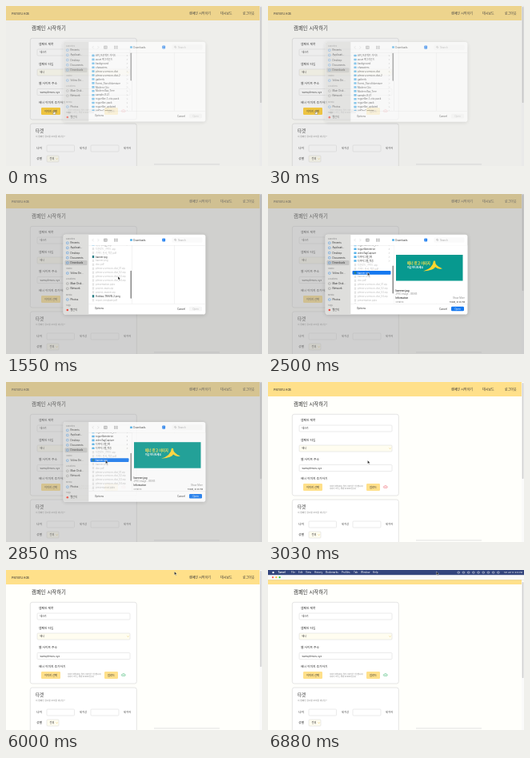
Write an HTML page that moves like this. It is 320 by 200 pixels and loops after 6920 ms.

```html
<!DOCTYPE html>
<html>
<head>
<meta charset="utf-8">
<style>
  html, body { margin: 0; height: 100%; overflow: hidden; background: #fffffb }
  svg { display: block; width: 100vw; height: 100vh }
  text { font-family: Inter, "Noto Sans CJK KR", "Noto Sans CJK", sans-serif; white-space: pre }
</style>
</head>
<body>
<svg id="stage" viewBox="0 0 320 200"></svg>
<script>
const LOOP = 6920;
const YELLOW = '#ffe08a', INK = '#333', GREY = '#888', BLUE = '#1478f0';

const rect = (x, y, w, h, fill, extra = '') =>
  `<rect x="${x}" y="${y}" width="${w}" height="${h}" fill="${fill}" ${extra}/>`;
const text = (x, y, size, s, fill = INK, extra = '') =>
  `<text x="${x}" y="${y}" font-size="${size}" fill="${fill}" ${extra}>${s}</text>`;
const path = (d, stroke, width = .5, extra = 'fill="none"') =>
  `<path d="${d}" stroke="${stroke}" stroke-width="${width}" ${extra}/>`;
const dot = (x, y, r, fill) => `<circle cx="${x}" cy="${y}" r="${r}" fill="${fill}"/>`;
const group = (id, body, extra = '') => `<g id="${id}" ${extra}>${body}</g>`;

const BOLD = 'font-weight="600"', MID = 'text-anchor="middle"', END = 'text-anchor="end"';
const field = (x, y, w, s = '', fill = '#fff') =>
  rect(x, y, w, 8, fill, 'rx="1" stroke="#d6d6d6" stroke-width=".5"') + text(x + 3.5, y + 5.2, 3, s);
const card = (y, h) => rect(30.3, y, 133, h, '#fff', 'rx="2.5" stroke="#d4d4d4" stroke-width=".6"');
const chevron = (x, y) => path(`M${x} ${y}l1 1 1-1`, '#e0b73c');
const button = (id, x, w, s) =>
  rect(x, 127, w, 9, YELLOW, `id="${id}" rx="1.2"`) + text(x + w / 2, 132.9, 3.3, s, INK, MID + ' font-weight="500"');

function page() {
  const label = (y, s) => text(41, y, 3.8, s, INK, 'font-weight="500"');
  return rect(0, 0, 320, 200, '#fffffb') + rect(0, 0, 320, 18, YELLOW) +
    text(7, 10.7, 3.8, 'Plenoru Ads') +
    text(229, 10.7, 4, '캠페인 시작하기') + text(268, 10.7, 4, '대시보드') + text(296, 10.7, 4, '로그아웃') +
    text(32, 30.2, 6.4, '캠페인 시작하기') +
    card(40.3, 101.7) +
    label(49.4, '캠페인 제목') + field(39, 54, 116, '테스트') +
    label(73.9, '캠페인 타입') + field(39, 79, 116, '배너', '#fffdf0') + chevron(151.5, 82.5) +
    label(98.2, '웹 사이트 주소') + field(39, 103.5, 116, 'www.plenoru.xyz') +
    label(122.4, '배너 이미지 추가하기') +
    button('pick', 44, 24, '이미지 선택') +
    text(77, 130.6, 2.3, '이미지 파일(jpg, 정지 이미지만 가능합니다)', GREY) +
    text(77, 134.3, 2.3, '이미지 크기는 최대 500KB 입니다', GREY) +
    button('send', 123, 17, '업로드') +
    group('cloud', path('M145.3 132.5a1.1 1.1 0 0 1 .1-2.2 1.5 1.5 0 0 1 2.7-.2 1.2 1.2 0 0 1 .1 2.4z', 'currentColor', .5, 'fill="currentColor" fill-opacity=".3"')) +
    card(147, 60) +
    text(37, 158.3, 5.5, '타겟') + text(37, 164, 2.7, '이 캠페인 광고를 보여줄 대상은?', GREY) +
    text(38, 179.2, 3.9, '나이') + field(51, 174, 34.5) + text(92, 179, 3, '세 이상') +
    field(106, 174, 35) + text(147, 179, 3, '세 이하') +
    text(38, 192.4, 3.9, '성별') + field(51, 187, 15, '전체', '#fffdf0') + chevron(62.6, 190.5) +
    rect(185, 197.6, 82, .7, '#d4d4d4') +
    rect(317, 0, 3, 200, '#fafafa') + rect(317.7, 1, 1.7, 120, '#d0d0d0', 'id="pageThumb" rx=".85"');
}

const FILES = `API_프로젝트 가이드
asset 백그라운드
background
characters
plenoru-version-dist
plenoru-version-dist-2
gatherly
Forest_StoryAdventure
Modern City
Modern Bay_Tree
sample-8.2.1
roguelike-1-city-pack
roguelike-pack
roguelike_updated
utilTagCapture
roguelikeforest_2.0
roguelikeinterior
videoTagCapture
다이어그램_1차
다이어그램_최종
다운로드_가이드.zip
가이드 문서_최종.pdf
banner.jpg
banner.png
doc.pdf
plenoru-version-dist_01.zip
plenoru-version-dist_02.zip
plenoru-version-dist_03.zip
plenoru-version-dist_04.zip
presentation.pptx
project-main.zip
project-master.zip
Holiday-TRAVEL2.jpeg
report-template.pdf`.split('\n');
const PICTURE = 22, FOLDERS = 20, ROW = 4.93;

function files() {
  return FILES.map((name, i) => {
    const y = 68 + i * ROW, folder = i < FOLDERS;
    const live = folder || /\.jpe?g$/.test(name);
    const icon = folder ? rect(107.4, y - 1.4, 3.2, 2.6, '#58b4ea', 'rx=".5"')
      : rect(107.8, y - 1.6, 2.4, 3.2, live ? '#2b7f86' : '#e4e4e4');
    return (i == PICTURE ? rect(105.5, y - 2.4, 48, 4.8, BLUE, 'id="pickRow" rx="1"') : '') + icon +
      text(112, y + 1.1, 2.9, name, live ? INK : '#b8b8b8', i == PICTURE ? 'id="pickName"' : '') +
      (folder ? path(`M151 ${y - .9}l.9.9-.9.9`, '#999', .4) : '');
  }).join('');
}

function sidebar() {
  const head = (y, s) => text(75, y, 2.5, s, '#999', BOLD);
  const item = (y, s, color = '#3f8fe0') =>
    rect(75.5, y - 2.2, 2.6, 2.4, 'none', `rx=".6" stroke="${color}" stroke-width=".5"`) + text(80.5, y, 3, s);
  return rect(71, 50, 32, 101, '#dededc') + rect(73.5, 83, 28, 6, '#c4c4c3', 'rx="1.2"') +
    head(57, 'Favorites') + item(62.2, 'Recents') + item(68.3, 'Applicati…') + item(74.5, 'Desktop') +
    item(80.7, 'Documents') + item(87, 'Downloads') +
    head(93.5, 'Volino') + item(100, 'Volino Dri…') +
    head(107, 'Locations') + item(113, 'Main Disk…', GREY) + item(119.2, 'Network', GREY) +
    head(126.5, 'Media') + item(133, 'Photos') + head(139.5, 'Tags') +
    dot(76.8, 145, 1.3, '#f0483e') + text(80.5, 146, 3, '빨간색');
}

function preview() {
  return rect(157.6, 64.3, 92, 72.5, '#fff') + rect(160, 76, 83.5, 32.5, '#07998f') +
    text(174, 88, 4.2, '배너 광고 이미지', '#ffe24a', 'font-weight="800"') +
    text(174, 93, 3, '지금 만나보세요', '#fff', BOLD) +
    '<path d="M207 83.5l2 .3q-.5 6 9 9.500-5 1.500-9-2-1 4-15 5.200 12-3.500 13-13z" fill="#ffd72e"/>' +
    text(159.5, 121.8, 3.3, 'banner.jpg', INK, BOLD) +
    text(159.5, 126, 2.8, 'JPEG image - 88 KB', GREY) +
    text(159.5, 131.3, 2.8, 'Information', INK, BOLD) + text(246, 131.3, 2.8, 'Show More', GREY, END) +
    text(159.5, 136, 2.6, 'Created', GREY) + text(246, 136, 2.6, 'Today, 8:43 PM', INK, END);
}

function dialog() {
  const line = (x, y, w, h) => rect(x, y, w, h, '#e2e2e2');
  return rect(71.5, 51.5, 178, 100, '#000', 'rx="3" opacity=".16" filter="url(#soft)"') +
    group('', rect(71, 50, 179, 101, '#fff') + sidebar() +
      line(103, 50, .4, 101) + line(103, 64, 147, .4) +
      path('M109.500 56l-1.500 1.600 1.500 1.600M114.500 56l1.500 1.600-1.500 1.600', '#bbb', .4) +
      path('M122.500 56h3.800v3.200h-3.800zM123.800 56v3.200M125 56v3.200', '#666', .4) +
      path('M135.500 56h1.300v1.200h-1.300zM138 56h1.300v1.200h-1.300zM135.500 58.200h1.300v1h-1.300zM138 58.200h1.300v1h-1.300z', '#777', .4) +
      rect(155, 56.2, 3, 2.5, '#58b4ea', 'rx=".5"') + text(159.3, 58.6, 2.9, 'Downloads') +
      rect(195.3, 55.4, 3.8, 4.2, BLUE, 'rx="1"') + path('M196.400 57l.8-.9.8.9M196.400 58.100l.8.9.8-.9', '#fff', .4) +
      rect(207.5, 54.2, 38, 6.6, '#fafafa', 'rx="1.3"') +
      '<circle cx="211.5" cy="57.2" r=".9" fill="none" stroke="#888" stroke-width=".4"/>' + path('M212.200 57.900l.8.8', GREY, .4) +
      text(215, 58.6, 2.9, 'Search', '#aaa') +
      line(157.2, 64, .4, 73) + line(210, 64, .4, 73) +
      group('', group('list', files()), 'clip-path="url(#listBox)"') +
      rect(155.5, 64.5, 1.5, 35, '#8c8c8c', 'id="thumb" rx=".75"') +
      group('preview', preview()) + line(103, 137, 147, .4) +
      text(111, 144.4, 3, 'Options') +
      text(219, 144.6, 3, 'Cancel', INK, MID) +
      rect(229, 140.7, 16, 5.6, '#f7f7f7', 'id="open" rx="1.2"') + text(237, 144.6, 3, 'Open', '#bbb', MID + ' id="openText"'),
      'clip-path="url(#sheet)"');
}

function menuBar() {
  const items = [[12.5, 'Tarvel'], [29, 'File'], [38, 'Edit'], [47, 'View'], [58, 'History'], [72, 'Bookmarks'],
    [92, 'Profiles'], [107, 'Tab'], [116, 'Window'], [131, 'Help']];
  let icons = '';
  for (let x = 237; x < 292; x += 6.2)
    icons += rect(x, 2.1, 2.5, 2, 'none', 'rx=".6" stroke="#fff" stroke-width=".5"');
  return rect(0, 12, 320, 1, '#000', 'opacity=".08"') + rect(0, 6, 320, 6.2, '#fafafa') +
    rect(0, 0, 320, 6.2, '#34457d') + dot(6.5, 3.1, 1.2, '#fff') +
    items.map(([x, s], i) => text(x, 4.2, 3, s, '#fff', i ? '' : 'font-weight="700"')).join('') + icons +
    text(318, 4.2, 2.4, 'Tue Jun 14  8:44 PM', '#fff', END) +
    dot(6, 9.2, 1.1, '#fb5f57') + dot(10.3, 9.2, 1.1, '#fdbc2e') + dot(14.6, 9.2, 1.1, '#28c840');
}

document.getElementById('stage').innerHTML =
  `<defs><clipPath id="sheet"><rect x="71.7" y="50.8" width="177.7" height="99.8" rx="2.8"/></clipPath>
   <clipPath id="listBox"><rect x="104" y="64.4" width="50" height="72.5"/></clipPath>
   <filter id="soft"><feGaussianBlur stdDeviation="2.5"/></filter></defs>` +
  page() + rect(0, 0, 320, 200, '#9b9b9b', 'id="dim"') + group('dialog', dialog()) + group('menu', menuBar()) +
  group('cursor',
    group('arrow', path('M0 0v4l1-.8.7 1.5.7-.3-.7-1.5h1.3z', '#fff', .35, 'fill="#111"')) +
    group('hand', path('M-.4 0h.8v1.7l1.6.4-.3 2.3h-2.5L-1.8 2.8l.5-.5.9.5z', '#333', .3, 'fill="#fff"')));

const el = id => document.getElementById(id);
const set = (id, name, value) => el(id).setAttribute(name, value);
const show = (id, on) => set(id, 'visibility', on ? 'visible' : 'hidden');

// Eased value of [time, ...values] keys at time t
function at(t, ...keys) {
  const i = keys.findIndex(k => k[0] > t);
  if (i == 0) return keys[0].slice(1);
  if (i < 0) return keys.at(-1).slice(1);
  const a = keys[i - 1], b = keys[i], u = (t - a[0]) / (b[0] - a[0]), e = u * u * (3 - 2 * u);
  return a.slice(1).map((v, j) => v + (b[j + 1] - v) * e);
}
const hoverColor = h => `rgb(255,${224 - 20 * h},${138 - 92 * h})`;

function draw(t) {
  const [open, drop, dim] = at(t, [0, .65, -6, .17], [350, 1, 0, .47], [2800, 1, 0, .47], [3020, 0, -6, 0]);
  set('dialog', 'opacity', open);
  set('dialog', 'transform', `translate(0 ${drop})`);
  set('dim', 'opacity', dim);

  const [scroll] = at(t, [750, 0], [1000, 92], [1150, 98], [1550, 98], [2000, 78]);
  set('list', 'transform', `translate(0 ${-scroll})`);
  set('thumb', 'y', 64.5 + scroll * .32);

  const picked = t >= 2400;
  show('pickRow', picked);
  set('pickName', 'fill', picked ? '#fff' : INK);
  show('preview', t >= 2450);
  set('open', 'fill', picked ? BLUE : '#f7f7f7');
  set('openText', 'fill', picked ? '#fff' : '#bbb');

  set('pick', 'fill', hoverColor(at(t, [0, 1], [300, 0])[0]));
  set('send', 'fill', hoverColor(at(t, [3400, 0], [3680, 1], [5200, 1], [5450, 0])[0]));
  set('cloud', 'color', t < 4130 ? '#f0808a' : '#62c58c');

  const [x, y] = at(t, [0, 60, 131], [100, 60, 131], [620, 129, 102], [750, 129, 102], [1000, 140, 103],
    [1550, 140, 103], [2200, 124.5, 98], [3080, 124.5, 98], [3430, 131, 131], [5030, 131, 131],
    [5700, 155, 135], [6000, 210.5, 2]);
  set('cursor', 'transform', `translate(${x} ${y})`);
  const hand = t < 120 || (t > 3400 && t < 5300);
  show('hand', hand);
  show('arrow', !hand);

  const [slide] = at(t, [6150, -14], [6500, 0]);
  set('menu', 'transform', `translate(0 ${slide})`);
  set('pageThumb', 'y', 15 + slide);
}

const start = performance.now();
function tick() {
  draw((performance.now() - start) % LOOP);
  requestAnimationFrame(tick);
}
tick();
</script>
</body>
</html>
```
